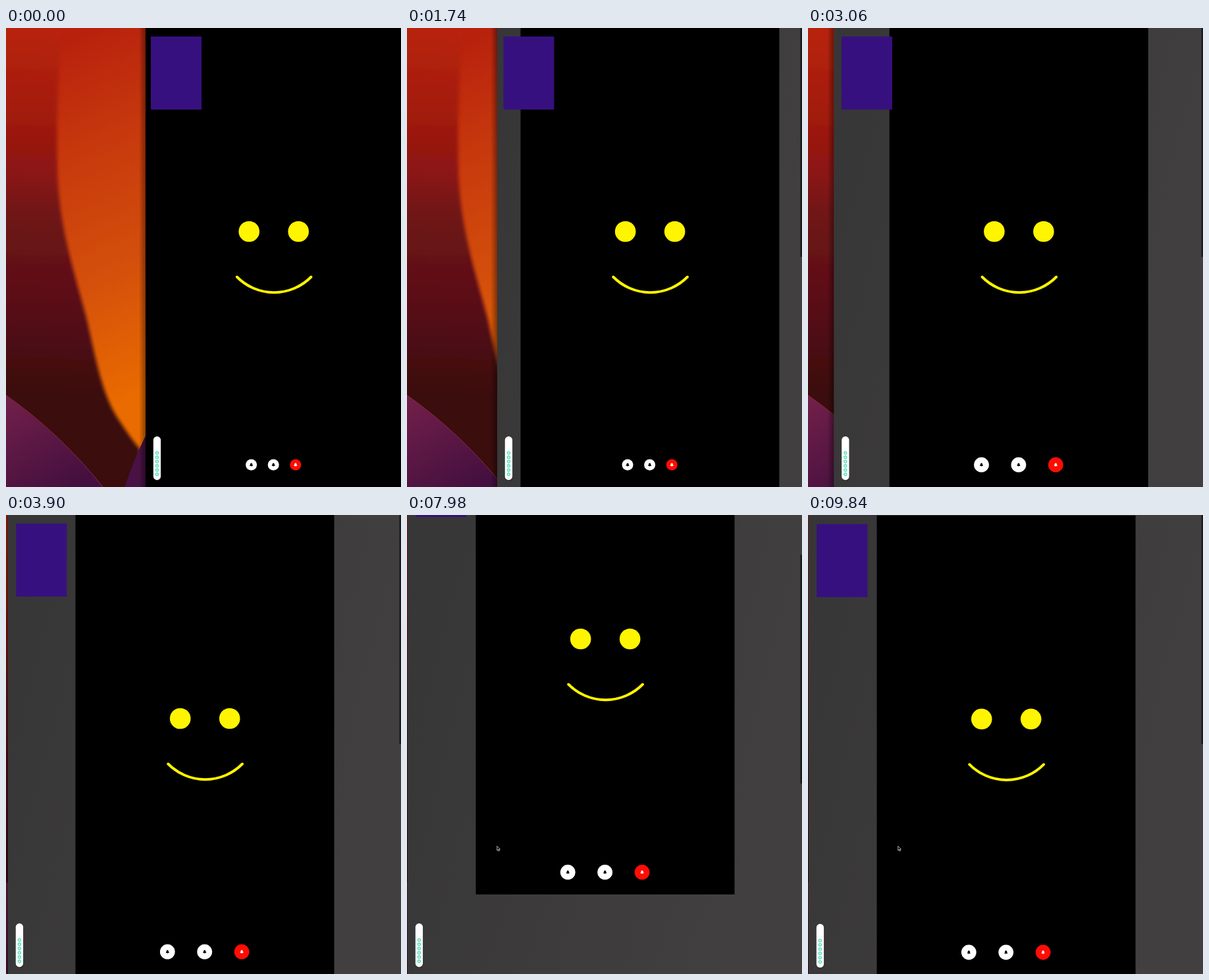
These frames come from a looping animation (600x698 px, 9900 ms). An HTML page:

```html
<!DOCTYPE html>
<html lang="en">
<head>
<meta charset="utf-8">
<title>Responsive call screen</title>
<style>
  html, body { margin: 0; width: 100%; height: 100%; overflow: hidden; background: #000; }
  svg { display: block; }
</style>
</head>
<body>
<svg width="600" height="698" viewBox="0 0 600 698">
  <defs>
    <linearGradient id="orange" gradientUnits="userSpaceOnUse" x1="0" y1="60" x2="212" y2="560">
      <stop offset="0" stop-color="#b8220d"/>
      <stop offset=".3" stop-color="#c7390d"/>
      <stop offset=".65" stop-color="#d4500b"/>
      <stop offset="1" stop-color="#ea6c00"/>
    </linearGradient>
    <linearGradient id="petal" gradientUnits="userSpaceOnUse" x1="20" y1="0" x2="0" y2="560">
      <stop offset="0" stop-color="#b8240e"/>
      <stop offset=".25" stop-color="#a01a0f"/>
      <stop offset=".4" stop-color="#8a1413"/>
      <stop offset=".5" stop-color="#701318"/>
      <stop offset=".75" stop-color="#591016"/>
      <stop offset="1" stop-color="#3a100e"/>
    </linearGradient>
    <linearGradient id="plum" x1="0" y1="0" x2=".6" y2="1">
      <stop offset="0" stop-color="#74204a"/>
      <stop offset="1" stop-color="#45103f"/>
    </linearGradient>
    <linearGradient id="shade">
      <stop offset="0" stop-opacity="0"/>
      <stop offset="1" stop-opacity=".4"/>
    </linearGradient>
    <linearGradient id="page" x1="0" y1="0" x2="1" y2=".3">
      <stop offset="0" stop-color="#373637"/>
      <stop offset="1" stop-color="#413f40"/>
    </linearGradient>
    <filter id="soft" x="-20%" width="140%"><feGaussianBlur stdDeviation="2.5"/></filter>
    <path id="bell" d="M-2.7 1.7Q-1.7 .8-1.7-.6Q-1.7-2.2-.5-2.5Q0-3.2.5-2.5Q1.7-2.2 1.7-.6Q1.7.8 2.7 1.7ZM-.8 2.1H.8Q.5 2.9 0 2.9T-.8 2.1Z"/>
  </defs>

  <rect width="212" height="698" fill="url(#orange)"/>
  <path filter="url(#soft)" fill="url(#petal)"
    d="M-20-20H84C80 60 76 150 78 215C80 300 102 365 122 440C138 510 146 560 174 600Q190 625 204 641L190 720H-20Z"/>
  <path fill="url(#plum)" stroke="#8c2748" d="M-2 557Q82 616 148 699H-2Z"/>
  <path fill="#491144" d="M213 618Q196 652 180 698H213Z"/>

  <rect id="edge" width="10" height="698" fill="url(#shade)"/>
  <rect id="window" height="698" fill="url(#page)"/>
  <g id="content">
    <rect id="panel" height="698"/>
    <rect id="preview" y="13" width="77" height="111" fill="#37107f"/>
    <g id="face">
      <circle cx="-37.3" cy="309.5" r="15.8" fill="#fff500"/>
      <circle cx="37.7" cy="309.5" r="15.8" fill="#fff500"/>
      <path d="M-55.7 378.5A79 79 0 0 0 57 378.5" fill="none" stroke="#fff500" stroke-width="4" stroke-linecap="round"/>
    </g>
    <g id="buttons"></g>
  </g>
  <g id="pill">
    <rect x=".8" y="622" width="11" height="67" rx="5.5" opacity=".25"/>
    <rect y="621" width="11.3" height="66.5" rx="5.6" fill="#fff"/>
  </g>
  <rect id="thumb" x="597.5" width="3" height="348" fill="#000" opacity=".6"/>
  <path id="arrow" d="M0 0V6.6L1.5 5.3L2.5 7.6L3.6 7.1L2.6 4.9H4.6Z" stroke="#ddd" stroke-width=".8"/>
  <path id="hand" d="M-1 0V3L-2.6 2.6L-1 6H2.4L3 2.6L.4 2.2V0Q-.3-.9-1 0Z" fill="#fff" stroke="#000" stroke-width=".8"/>
</svg>
<script>
const LOOP = 9900, STEP = 60;
const $ = id => document.getElementById(id);
const move = (el, x, y = 0, scale = 1) =>
  el.setAttribute('transform', `translate(${x} ${y}) scale(${scale})`);

// Smooth monotone curve through alternating time, value pairs
function track(...keys) {
  const ts = keys.filter((_, i) => i % 2 === 0), vs = keys.filter((_, i) => i % 2);
  const rise = i => (vs[i + 1] - vs[i]) / (ts[i + 1] - ts[i]);
  const slopes = ts.map((_, i) => {
    if (!i || i === ts.length - 1) return 0;
    const a = rise(i - 1), b = rise(i);
    return a * b > 0 ? 2 * a * b / (a + b) : 0;
  });
  return t => {
    if (t <= ts[0]) return vs[0];
    const i = ts.findIndex(k => k >= t) - 1;
    if (i < 0) return vs[vs.length - 1];
    const d = ts[i + 1] - ts[i], u = (t - ts[i]) / d, w = 1 - u;
    return w * w * ((1 + 2 * u) * vs[i] + u * d * slopes[i]) +
           u * u * ((1 + 2 * w) * vs[i + 1] - w * d * slopes[i + 1]);
  };
}

const leftEdge = track(0, 212, 1200, 178, 2340, 84, 3900, 3, 4020, 1);
const cursorX = track(4140, 3, 4700, 90, 5400, 243, 6240, 243, 6840, 136.8);
const cursorY = track(4140, 400, 4700, 520, 5400, 664, 6240, 664, 6840, 503.5);
const hover = track(5220, 1, 5520, 1.27, 6300, 1.27, 6600, 1);
const scroll = track(7020, 0, 7980, 121, 8460, 165, 9540, -3, 9840, -.8);

const SVG = 'http://www.w3.org/2000/svg';
function add(parent, tag, attrs) {
  const el = parent.appendChild(document.createElementNS(SVG, tag));
  for (const name in attrs) el.setAttribute(name, attrs[name]);
  return el;
}

const buttons = ['#fff', '#fff', '#ff0d05'].map((fill, i) => {
  const group = add($('buttons'), 'g');
  const disc = add(group, 'circle', { fill });
  add(group, 'use', { href: '#bell', fill: i < 2 ? '#000' : '#fff' });
  return { group, disc };
});
for (let i = 0; i < 6; i++)
  add($('pill'), 'circle', { cx: 5.6, cy: 646.3 + i * 6.5, r: 2.1, fill: '#d2f7ec', stroke: '#50dfba', 'stroke-width': 1.2 });

function draw(t) {
  const left = leftEdge(t), width = 601 - left, center = left + width / 2;
  const panelWidth = Math.min(393, width), wide = left < 45, y = scroll(t);

  move($('edge'), left - 10);
  $('window').setAttribute('x', left);
  $('window').setAttribute('width', width);
  $('panel').setAttribute('x', center - panelWidth / 2);
  $('panel').setAttribute('width', panelWidth);
  $('preview').setAttribute('x', left + width * .0205);
  move($('content'), 0, -y);
  move($('face'), center);
  move($('pill'), left + 11.8, Math.max(0, -y));
  move($('thumb'), 0, Math.max(0, y / 2));

  buttons.forEach(({ group, disc }, i) => {
    disc.setAttribute('r', wide ? 11.4 : 8.5);
    move(group, center - .3 + (i - 1) * (wide ? 56.4 : 33.6), 664.2, i ? 1 : hover(t));
  });

  const over = t >= 5280 && t < 6360;
  $('arrow').style.display = t >= 4140 && !over ? '' : 'none';
  $('hand').style.display = over ? '' : 'none';
  for (const id of ['arrow', 'hand']) move($(id), cursorX(t), cursorY(t));
}

const start = performance.now();
function tick() {
  const t = (performance.now() - start) % LOOP;
  draw(Math.floor(t / STEP) * STEP);
  requestAnimationFrame(tick);
}
tick();
</script>
</body>
</html>
```
